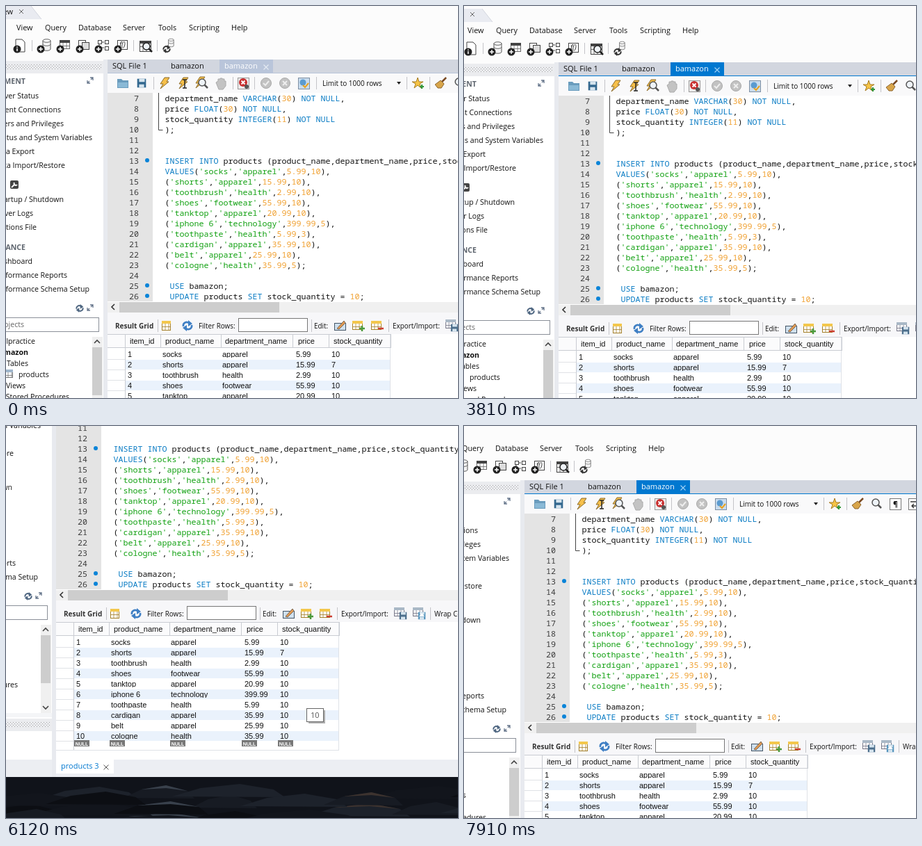
Animation, 650 px wide and 564 px high, one loop 8000 ms. Source, as an HTML page with a canvas:

```html
<!DOCTYPE html>
<html>
<head>
<meta charset="utf-8">
<style>
html, body { margin: 0; width: 650px; height: 564px; overflow: hidden; background: #fff; }
canvas { display: block; }
</style>
</head>
<body>
<canvas id="stage" width="650" height="564"></canvas>
<script>
const ctx = document.getElementById('stage').getContext('2d');
const LOOP = 8000;
const UI = '10.6px "Open Sans", sans-serif';
const SMALL = '9.9px "Open Sans", sans-serif';
const TAB = '11px "Open Sans", sans-serif';
const GRID = '11px "Liberation Sans", Arial, sans-serif';
const MONO = '11.67px "Noto Sans Mono", monospace';
const INK = '#111', BLUE = '#0078d0', LINE = '#c9ccd2';
const BOTTOM = 695;

// Camera pans in hard steps: [ms, x, y]
const camera = [
  [0, 0, 0], [3810, -10, 4], [3930, -35, 14], [4080, -62, 24], [4200, -79, 29],
  [4640, -83, 26], [4760, -100, 13], [4910, -121, -4], [5030, -140, -20], [5150, -157, -33],
  [5420, -164, -39], [5540, -150, -64], [5690, -130, -98], [5840, -110, -132], [5970, -92, -162],
  [6120, -74, -190], [6240, -68, -201], [6390, -66, -205], [7100, -71, -194], [7240, -78, -163],
  [7360, -83, -130], [7510, -77, -92], [7670, -70, -50], [7790, -64, -20], [7910, -59, 1]
];
const pointer = [
  [0, -99, 0], [400, 627, 389], [550, 633, 386], [670, 651, 384], [920, -99, 0],
  [1200, 630, 387], [1630, 624, 430], [1760, 610, 479], [1900, 596, 520], [2020, 575, 555], [2140, -99, 0]
];
const at = (steps, t) => steps.findLast(s => s[0] <= t);

const products = [
  ['socks', 'apparel', '5.99', 10], ['shorts', 'apparel', '15.99', 10],
  ['toothbrush', 'health', '2.99', 10], ['shoes', 'footwear', '55.99', 10],
  ['tanktop', 'apparel', '20.99', 10], ['iphone 6', 'technology', '399.99', 5],
  ['toothpaste', 'health', '5.99', 3], ['cardigan', 'apparel', '35.99', 10],
  ['belt', 'apparel', '25.99', 10], ['cologne', 'health', '35.99', 5]
];
const code = [
  'department_name VARCHAR(30) NOT NULL,', 'price FLOAT(30) NOT NULL,',
  'stock_quantity INTEGER(11) NOT NULL', ');', '', '',
  'INSERT INTO products (product_name,department_name,price,stock_quantity)',
  ...products.map(([name, dept, price, qty], i) =>
    `${i ? '' : 'VALUES'}('${name}','${dept}',${price},${qty})${i < 9 ? ',' : ';'}`),
  '', ' USE bamazon;', ' UPDATE products SET stock_quantity = 10;'
];

function rect(x, y, w, h, color) {
  ctx.fillStyle = color;
  ctx.fillRect(x, y, w, h);
}
function frame(x, y, w, h, color, fill) {
  if (fill) rect(x, y, w, h, fill);
  ctx.strokeStyle = color;
  ctx.lineWidth = 1;
  ctx.strokeRect(x + .5, y + .5, w - 1, h - 1);
}
// y is the visual middle of the line
function text(str, x, y, font = UI, color = INK, align = 'left') {
  ctx.font = font;
  ctx.fillStyle = color;
  ctx.textAlign = align;
  ctx.fillText(str, x, y + 4);
}
function shape(x, y, d, fill, stroke, width = 1, scale = 1) {
  const path = new Path2D(d);
  ctx.save();
  ctx.translate(x, y);
  ctx.scale(scale, scale);
  if (fill) { ctx.fillStyle = fill; ctx.fill(path); }
  if (stroke) { ctx.strokeStyle = stroke; ctx.lineWidth = width; ctx.stroke(path); }
  ctx.restore();
}
function dot(x, y, r, fill, stroke, width = 1) {
  ctx.beginPath();
  ctx.arc(x, y, r, 0, 7);
  if (fill) { ctx.fillStyle = fill; ctx.fill(); }
  if (stroke) { ctx.strokeStyle = stroke; ctx.lineWidth = width; ctx.stroke(); }
}
function grip(y) {
  rect(0, y - 8, 140, 18, '#ebecef');
  for (let row = 0; row < 4; row++)
    for (let x = row % 2 * 2; x < 137; x += 4) rect(x, y - 3 + row * 2, 1, 1, '#a4a4a4');
}

// Icons
const cross = (x, y, r, color, w = 1) => shape(x, y, `M${-r} ${-r}L${r} ${r}M${r} ${-r}L${-r} ${r}`, null, color, w);
const bolt = (x, y) => shape(x, y, 'M0-8L7-8L3-2L6-2L-6 8L-2 1L-6 1Z', '#f7c04a', '#8a6a2a');
const separator = (x, y, h = 18) => rect(x, y - h / 2, 1, h, '#c4c4c8');
const expand = (x, y) => shape(x, y, 'M0-4H4V0M4-4L1-1M-4 0V4H0M-4 4L-1 1', null, '#64748a', 1.3);
function refresh(x, y, color = '#3f7fc4', scale = 1) {
  shape(x, y, 'M-6 1A5 5 0 0 1 2-4M6-1A5 5 0 0 1-2 4', null, color, 2.6, scale);
  shape(x, y, 'M1-8L7-3L1 1ZM-1 8L-7 3L-1-1Z', color, null, 1, scale);
}
function lens(x, y, color = '#555') {
  shape(x, y, 'M2 2L7 7', null, color, 2.5);
  dot(x - 1, y - 1, 5, '#eef3f8', color, 1.5);
}
function badge(x, y) {
  dot(x, y, 5.5, '#222');
  shape(x, y, 'M-3 0H3M0-3V3', null, '#fff', 1.5);
}
function table(x, y, head = '#444', line = '#666', w = 15, h = 13) {
  frame(x - 8, y - 7, w, h, line, '#fff');
  rect(x - 8, y - 7, w, 4, head);
  shape(x - 8, y - 7, `M5 4V${h}M10 4V${h}M0 8.5H${w}`, null, line, .8);
}
function disk(x, y, color = '#33688f', scale = 1) {
  shape(x, y, 'M-7-7H7V7H-7Z', color, null, 1, scale);
  shape(x, y, 'M-4-7H5V-2H-4ZM-4 2H4V7H-4Z', '#d5e4ee', null, 1, scale);
}
function database(x, y, scale = 1) {
  shape(x, y, 'M-5-6V6C-5 9 6 9 6 6V-6', '#f2f2f2', '#555', 1, scale);
  shape(x, y, 'M-5-6C-5-9 6-9 6-6C6-3-5-3-5-6ZM-5-1C-5 2 6 2 6-1', '#fff', '#555', 1, scale);
}

function menuBar() {
  rect(0, -60, 900, 157, '#fcfcfc');
  shape(0, 0, 'M0 0H36L51 19H0Z', '#e9ebf1');
  shape(0, 0, 'M36 0L51 19', null, '#d3d6de');
  text('ew', -4, 8);
  cross(22, 8, 3, '#666');
  [['View', 15], ['Query', 56], ['Database', 104], ['Server', 168], ['Tools', 219], ['Scripting', 263], ['Help', 324]]
    .forEach(([label, x]) => text(label, x, 31, '10.8px "Open Sans", sans-serif'));

  shape(19, 57, 'M-5-9H4L8-5V9H-5Z', '#fff', '#444');
  dot(16, 62, 5.5, '#222');
  shape(16, 62, 'M0-1V3M0-3.5V-2', null, '#fff', 1.5);
  database(58, 56);
  table(85, 56);
  frame(104, 49, 11, 11, '#444', '#fff');
  frame(109, 52, 11, 11, '#444', '#ddd');
  [[132, 49], [142, 49], [142, 58]].forEach(([x, y]) => frame(x, y, 6, 6, '#444'));
  shape(138, 57, 'M-1-5H3M-4-3V3H3', null, '#444');
  frame(160, 49, 15, 14, '#444', '#fff');
  text('f()', 163, 55, 'italic ' + SMALL);
  [50, 78, 106, 133, 161].forEach(x => badge(x, 62));
  table(200, 57, '#444', '#444', 17, 16);
  lens(203, 59, '#222');
  database(237, 53, .7);
  refresh(231, 62, '#333', .75);
  [37, 183, 217].forEach(x => separator(x, 57, 16));
  dot(813, 57, 6, null, '#444', 4);
}

function sidebar() {
  rect(0, 97, 140, BOTTOM - 97, '#fff');
  grip(87);
  [['MANAGEMENT', 28, 108], ['PERFORMANCE', 28, 347]]
    .forEach(([s, x, y]) => text(s, x, y, 'bold ' + UI, '#606770', 'right'));
  [['Server Status', 47, 129], ['Client Connections', 79, 149], ['Users and Privileges', 83, 169],
   ['Status and System Variables', 124, 189], ['Data Export', 41, 209], ['Data Import/Restore', 85, 229],
   ['Startup / Shutdown', 83, 278], ['Server Logs', 39, 298], ['Options File', 44, 318],
   ['Dashboard', 38, 367], ['Performance Reports', 88, 387], ['Performance Schema Setup', 120, 407]]
    .forEach(([s, x, y]) => text(s, x, y, UI, INK, 'right'));
  expand(121, 107);
  shape(12, 257, 'M-6-4Q-6-6-4-6H4Q6-6 6-4V4Q6 6 4 6H-4Q-6 6-6 4Z', '#444');
  shape(12, 257, 'M-4 4L1-1M0-3A2.5 2.5 0 1 0 4 0', null, '#fff', 1.8);
  refresh(106, 435, '#4d6580', .75);
  expand(121, 434);
  frame(-4, 448, 138, 21, '#8a8f98', '#fff');
  text('Filter objects', 26, 458, UI, '#666', 'right');
  text('sqlpractice', 42, 482, UI, INK, 'right');
  text('bamazon', 32, 498, 'bold ' + UI, INK, 'right');
  text('Tables', 32, 514, UI, INK, 'right');
  table(6, 530, '#9fb6cc', '#777', 12, 12);
  text('products', 18, 530);
  text('Views', 28, 546, UI, INK, 'right');
  text('Stored Procedures', 91, 562, UI, INK, 'right');
  rect(124, 476, 15, 127, '#f0f0f0');
  rect(124, 491, 14, 69, '#cdcdcd');
  shape(131, 483, 'M-4 2L0-2L4 2', null, '#444', 1.6);
  shape(131, 595, 'M-4-2L0 2L4-2', null, '#444', 1.6);
  rect(0, 603, 140, 6, '#f4f5f7');
  grip(619);
  rect(0, 629, 140, 3, '#fff');
  rect(0, 670, 140, BOTTOM - 670, '#eceef2');
  rect(140, 77, 6, BOTTOM - 77, '#e8eaef');
}

function tabs(active) {
  const color = active ? BLUE : '#b9c5da';
  rect(146, 77, 800, 20, '#d2d6df');
  rect(307, 77, 77, 19, color);
  rect(146, 96, 800, 1, color);
  text('SQL File 1', 153, 86, TAB);
  text('bamazon', 237, 86, TAB);
  text('bamazon', 314, 86, TAB, '#fff');
  cross(374, 88, 3.5, active ? '#9fd0f5' : '#e4eaf2', 1.2);
}

function editorTools() {
  rect(146, 97, 800, 28, '#f9f9fa');
  shape(168, 111, 'M-8-6H-2L0-4H8V7H-8Z', '#6a9cbd');
  rect(161, 110, 14, 7, '#8ab9d6');
  disk(195, 111, '#33688f', .9);
  bolt(228, 111);
  bolt(255, 111);
  shape(257, 112, 'M-3-6H3M0-6V6M-3 6H3', null, '#222', 1.5);
  bolt(279, 110);
  lens(283, 111);
  shape(309, 112, 'M-7-2L-4-4V-7H-1V-8H2V-7H5V-4H7V3L3 8H-3Z', '#c3c3c3', '#aaa');
  frame(333, 103, 17, 17, '#999', '#eee');
  dot(341, 110, 6, '#c93030');
  cross(341, 110, 2.5, '#fff', 1.8);
  dot(346, 116, 3, '#555');
  [374, 401].forEach(x => dot(x, 111, 7.5, '#c2c2c2', '#aaa'));
  shape(374, 111, 'M-4 0L-1 3L4-3', null, '#eee', 2);
  cross(401, 111, 3, '#eee', 2);
  frame(420, 103, 17, 17, '#7d8fa3', '#c9dcee');
  dot(427, 110, 4.5, '#5b9bd0');
  shape(431, 114, 'M-4 0L-1 3L4-3', null, '#e9a21d', 2);
  text('Limit to 1000 rows', 455, 111, '10px "Open Sans", sans-serif');
  shape(565, 111, 'M-3-2H3L0 2Z', '#222');
  shape(592, 111, 'M0-8L2-2H8L3 1L5 7L0 3L-5 7L-3 1L-8-2H-2Z', '#f6c445', '#a77d25');
  shape(598, 116, 'M-3 0H3M0-3V3', null, '#32963a', 2.2);
  shape(625, 111, 'M2-2L8-8', null, '#7a4a22', 2.5);
  shape(625, 111, 'M-8 2L0-4L5 1L1 7H-4Z', '#d8a54a', '#8b6530');
  lens(652, 110);
  [679, 706].forEach(x => frame(x - 8, 103, 17, 17, '#777', '#fff'));
  text('¶', 676, 111, 'bold ' + UI);
  shape(706, 111, 'M-5-3H4V3H-3M0 0L-3 3L0 6', null, '#333', 1.4);
  [212, 326, 357, 446, 576, 609].forEach(x => separator(x, 111));
}

function editor(t) {
  rect(146, 125, 800, 302, '#fff');
  rect(146, 125, 65, 300, '#e4e4e4');
  if (t >= 1200 && t < 3510) {
    rect(228, 380, 700, 15, '#e8f8fd');
    if (t < 1630 || t >= 2140 && t < 2690 || t >= 3250) rect(283, 380, 1, 15, '#000');
  }
  shape(219.5, 125, 'M0 0V53.5H6', null, '#444');
  code.forEach((line, i) => {
    const y = 133 + 15 * i;
    text(i + 7, 191, y, MONO, '#3c3c3c', 'right');
    for (const { 0: token, index } of line.matchAll(/'[^']*'|\d[\d.]*|\w+|\W/g)) {
      const color = token[0] === "'" ? '#10a010' : /^\d/.test(token) ? '#f0a030'
        : /^[A-Z]+$/.test(token) ? '#0a7cc4' : INK;
      text(token, 228.5 + 7 * index, y, MONO, color);
    }
  });
  [222, 402, 417].forEach(y => dot(203, y, 3, '#0a84d8'));
  rect(146, 426, 800, 15, '#f0f0f0');
  rect(163, 426, 230, 15, '#cdcdcd');
  shape(154, 433, 'M2-4L-2 0L2 4', null, '#333', 1.6);
}

function resultTools() {
  rect(146, 441, 800, 31, '#f7f7f9');
  text('Result Grid', 157, 460, 'bold 10px "Open Sans", sans-serif', '#333');
  table(232, 460, '#f3c74c', '#a5812b', 13, 14);
  refresh(261, 460);
  [['Filter Rows:', 277], ['Edit:', 443], ['Export/Import:', 556], ['Wrap Cell Content:', 690]]
    .forEach(([s, x]) => text(s, x, 460, SMALL));
  frame(334, 449, 100, 20, '#777', '#fff');
  frame(472, 456, 17, 11, '#456', '#cfe0ee');
  shape(480, 460, 'M-4 4L6-7L8-4L-1 5Z', '#e29a52', '#765');
  table(506, 460, '#f3c74c', '#a5812b');
  shape(512, 464, 'M-4 0H4M0-4V4', null, '#4b9a3c', 2.5);
  table(533, 460, '#f3c74c', '#a5812b');
  shape(539, 464, 'M-4 0H4', null, '#cc3d30', 2.5);
  [640, 667].forEach(x => table(x, 458, '#a9b8c6', '#778'));
  disk(645, 463, '#4d6f8c', .75);
  disk(672, 463, '#5795bd', .75);
  shape(672, 463, 'M0-4L4 1H-4Z', '#fff');
  shape(792, 460, 'M-5-5H6M-5 5H6M-3-4V4M-1 4L2-4L5 4M0 1H4', null, '#345', 1.2);
  [218, 439, 550, 684].forEach(x => separator(x, 460));
}

function resultGrid() {
  rect(146, 472, 800, 198, '#fff');
  rect(146, 472, 407, 20, '#fbfbfc');
  const cols = [171, 222, 309, 412, 464, 553];
  ['item_id', 'product_name', 'department_name', 'price', 'stock_quantity']
    .forEach((s, i) => text(s, [178, 229, 315, 420, 471][i], 482, GRID));
  products.forEach(([name, dept, price], i) => {
    const y = 501 + 15 * i;
    if (i % 2) rect(172, y - 7, 380, 14, '#eaf2fc');
    ctx.save();
    ctx.beginPath();
    ctx.rect(146, y - 7, 407, 12);
    ctx.clip();
    [i + 1, name, dept, price, name === 'shorts' ? 7 : 10]
      .forEach((s, c) => text(s, [175, 225, 311, 417, 468][c], y, GRID));
    ctx.restore();
    rect(146, y + 7, 25, 1, '#e0e2e6');
  });
  cols.slice(0, 5).forEach(x => {
    rect(x + 1, 642, 22, 9, '#777');
    text('NULL', x + 12, 645.5, 'bold 7px "Liberation Sans", sans-serif', '#fff', 'center');
  });
  cols.forEach(x => rect(x, 472, 1, 20, LINE));
  rect(171, 472, 1, 185, LINE);
  rect(552, 472, 1, 185, '#dfe2e7');
  rect(146, 472, 407, 1, LINE);
  rect(146, 491, 407, 1, LINE);
  rect(146, 656, 407, 1, '#dfe2e7');

  rect(146, 670, 800, BOTTOM - 670, '#eceef3');
  rect(146, 669, 83, 21, '#fff');
  text('products 3', 153, 679, TAB, BLUE);
  cross(218, 681, 3.5, '#555');
  rect(509, 599, 24, 19, '#b0b0b0');
  frame(506, 596, 25, 20, '#666', '#fff');
  text('10', 512, 606, TAB, '#555');
}

function wallpaper() {
  rect(0, BOTTOM, 900, 120, '#10131a');
  const tones = ['#171b23', '#0c0e13', '#1d222b', '#12151c'];
  for (let i = 0; i < 30; i++) {
    const x = i * 97 % 870, y = BOTTOM + 6 + i * 37 % 62, w = 45 + i * 13 % 50;
    shape(x, y, `M${-w} 14L${-w * .5} 2L${w * .2}-4L${w * .8} 4L${w} 15Z`, tones[i % 4]);
    if (i % 3 === 0) shape(x, y, `M${-w * .5} 2L${w * .2}-4L${w * .8} 4L${w * .2} 0Z`, x > 470 ? '#3d332f' : '#39414c');
  }
}

function draw(t) {
  const [, x, y] = at(camera, t);
  ctx.setTransform(1, 0, 0, 1, x, y);
  wallpaper();
  menuBar();
  sidebar();
  tabs(t >= 1200);
  editorTools();
  editor(t);
  resultTools();
  resultGrid();
  const [, px, py] = at(pointer, t);
  shape(px, py, 'M-4-9H-1L0-8L1-9H4M0-8V8M-4 9H-1L0 8L1 9H4', null, '#222');
}

function tick() {
  draw(performance.now() % LOOP);
  requestAnimationFrame(tick);
}
tick();
</script>
</body>
</html>
```
